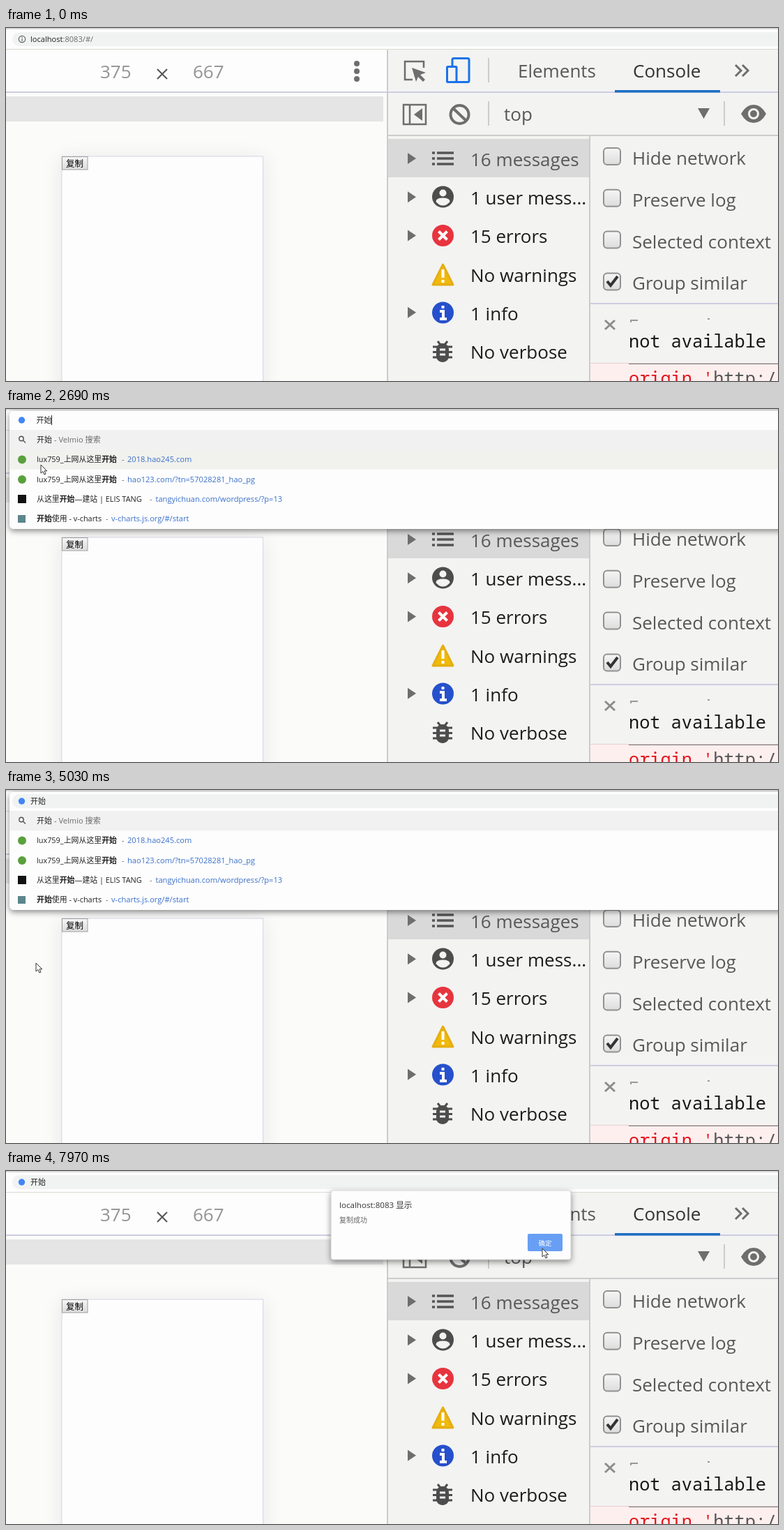
Recreate the animation shown at these times as an HTML page. Size 1107 by 506 pixels, loop 8 s.

```html
<!DOCTYPE html>
<html lang="zh">
<head>
<meta charset="utf-8">
<style>
html, body { margin: 0; width: 100%; height: 100%; overflow: hidden; background: #fbfbfb; }
svg { display: block; font: 11.1px "Open Sans", "Noto Sans CJK SC", "Noto Sans CJK", sans-serif; }
text { white-space: pre; }
.big { font-size: 26px; fill: #585858; }
.dark { fill: #1c1c1c; }
.mono { font: 25.25px "Noto Sans Mono", "DejaVu Sans Mono", monospace; fill: #161616; }
.line { fill: none; stroke: #6e6e6e; stroke-width: 2.5; }
.icon { fill: #6e6e6e; }
.sep { stroke: #ccc; stroke-width: 2; }
.rule { stroke: #cdcde2; stroke-width: 2; }
.url { fill: #3a70c8; }
.grey { fill: #6b6b6b; }
.b { font-weight: 700; }
</style>
</head>
<body>
<svg width="1107" height="506" viewBox="0 0 1107 506">
  <defs>
    <linearGradient id="face" x2="0" y2="1">
      <stop stop-color="#f6f6f6"/><stop offset="1" stop-color="#dcdcdc"/>
    </linearGradient>
    <filter id="soft" x="-20%" y="-20%" width="140%" height="140%"><feGaussianBlur stdDeviation="14"/></filter>
    <filter id="shade" x="-10%" y="-20%" width="120%" height="150%">
      <feDropShadow dx="0" dy="3" stdDeviation="4" flood-opacity=".45"/>
    </filter>
  </defs>

  <!-- device preview -->
  <rect width="547" height="506" fill="#fbfbfa"/>
  <rect y="31" width="547" height="61" fill="#fdfdfd"/>
  <path class="rule" d="M0 92H547"/>
  <rect y="98" width="541" height="36" fill="#e5e5e5"/>
  <g class="big" style="fill:#949494"><text x="135" y="72">375</text><text x="268" y="72">667</text></g>
  <path class="line" d="M217 59L231 73M231 59L217 73" style="stroke:#555;stroke-width:2"/>
  <g class="icon"><circle cx="503" cy="51" r="4"/><circle cx="503" cy="62" r="4"/><circle cx="503" cy="73" r="4"/></g>
  <rect x="78" y="186" width="293" height="340" opacity=".08" filter="url(#soft)"/>
  <rect x="80" y="184" width="288.5" height="340" fill="#fdfdfe" stroke="#d6d6e6"/>
  <rect x="80.5" y="184.5" width="36.5" height="18.5" fill="url(#face)" stroke="#a0a0a0"/>
  <text x="86" y="198.5" font-size="12.5">复制</text>

  <!-- developer tools -->
  <rect x="547" y="30" width="560" height="476" fill="#f3f3f2"/>
  <path class="sep" d="M547 30V506M692 43V78M692 105V140M1030 105V140M837 155V506"/>
  <path class="rule" d="M548 92H1107M838 395H1107"/>
  <path class="sep" d="M548 154H1107"/>
  <rect x="873" y="89" width="151" height="3.5" fill="#1c6fc4"/>
  <path class="line" d="M599 57V48H572V74H583"/>
  <path class="icon" d="M582 57L602 64L594 67L601 74L598 77L591 70L588 77Z"/>
  <g fill="#f3f3f2" stroke="#1a73e8" stroke-width="3">
    <rect x="640" y="43.5" width="24" height="34" rx="2"/><rect x="632.5" y="55.5" width="13.5" height="22" rx="1"/>
  </g>
  <path class="line" d="M1046 53L1054 61L1046 69M1056 53L1064 61L1056 69" style="stroke-width:3"/>
  <g class="big">
    <text x="734" y="71">Elements</text>
    <text x="899" y="71" style="fill:#333">Console</text>
    <text x="714" y="133">top</text>
  </g>
  <path class="line" d="M570 110H602V138H570ZM579 110V138"/>
  <path class="icon" d="M597 115V133L585 124ZM992 115H1009L1000.5 130Z"/>
  <g class="line" style="stroke-width:4"><circle cx="650.5" cy="124" r="13"/><path d="M641 115L660 133"/></g>
  <path class="icon" d="M1054 123Q1061 110 1072 110T1090 123Q1083 136 1072 136T1054 123Z"/>
  <circle cx="1072" cy="123" r="6.5" fill="#6e6e6e" stroke="#f3f3f2" stroke-width="3"/>

  <rect x="548" y="159" width="288" height="55" fill="#d9d9d9"/>
  <g id="side"></g>
  <path d="M618 179H642M618 187H642M618 195H642M611 179H615M611 187H615M611 195H615" stroke="#555" stroke-width="3.5"/>
  <circle cx="626.5" cy="242" r="15.5" fill="#4d4d4d"/>
  <circle cx="626.5" cy="236.5" r="5" fill="#f3f3f2"/>
  <path d="M616.500 249Q616.500 243.500 626.500 243.500T636.500 249Q632 254.500 626.500 254.500T616.500 249Z" fill="#f3f3f2"/>
  <circle cx="626.5" cy="297.5" r="15.5" fill="#e7343e"/>
  <path d="M620.500 291.500L632.500 303.500M632.500 291.500L620.500 303.500" stroke="#fff" stroke-width="4"/>
  <path d="M626.500 339L641 368H612Z" fill="#f0ba0c" stroke="#e5ae14" stroke-width="3" stroke-linejoin="round"/>
  <path d="M626.500 346V358M626.500 361V365" stroke="#fff" stroke-width="4"/>
  <circle cx="626.5" cy="408" r="15.5" fill="#2650cc"/>
  <path d="M626.500 398V402M622 406H627V416M622 417H632" fill="none" stroke="#fff" stroke-width="4"/>
  <g stroke="#4d4d4d" stroke-width="3">
    <path d="M612 457H640M612 464.500H640M612 472H640M619 449L623 454M633 449L629 454"/>
    <rect x="618.5" y="453.5" width="15" height="24" rx="7" fill="#4d4d4d"/>
    <path d="M622 461H630M622 468H630" stroke="#f3f3f2"/>
  </g>
  <g id="checks"></g>
  <path d="M862 363L867 369L877 356" fill="none" stroke="#333" stroke-width="4"/>

  <path class="line" d="M859 419L873 432M873 419L859 432" style="stroke:#8c8c8c;stroke-width:3"/>
  <path d="M896 422V419H906M1006 417H1009" fill="none" stroke="#999" stroke-width="2"/>
  <text class="mono" x="893" y="458">not available</text>
  <rect x="838" y="481" width="269" height="25" fill="#fdefee"/>
  <path d="M838 480.500H1107" stroke="#e6cfcf"/><path d="M893 481.500H1107" stroke="#777"/>
  <text class="mono" x="893" y="511" style="fill:#e3141c">origin '<tspan fill="#555">http:/</tspan></text>

  <!-- address bar -->
  <rect width="1107" height="30" fill="#fdfdfd"/>
  <rect width="1107" height="2" fill="#d9dbd9"/>
  <path d="M0 30.500H1107" stroke="#d8dbd0"/>
  <g id="drop">
    <rect x="5" y="3" width="1115" height="169" rx="6" fill="#fdfdfe" filter="url(#shade)"/>
    <rect x="5" y="30" width="1102" height="28.3" fill="#f1f1f1"/>
    <rect id="hover" x="5" width="1102" height="28.3" fill="#f1f1ee"/>
    <g fill="none" stroke="#555" stroke-width="1.4"><circle cx="22" cy="42.5" r="3.2"/><path d="M24.500 45L28 48.500"/></g>
    <circle cx="23" cy="72.5" r="6" fill="#5aa03c"/><circle cx="23" cy="101" r="6" fill="#5aa03c"/>
    <rect x="17" y="123" width="12" height="12" fill="#111"/>
    <rect x="17" y="152" width="11" height="11" fill="#5d858c"/>
    <g id="rows"></g>
  </g>
  <rect id="pill" x="9" y="6" width="1120" height="20" rx="10" fill="#f0f3f2"/>
  <g id="local">
    <circle cx="23" cy="16" r="4.7" fill="none" stroke="#5f6368" stroke-width="1.2"/>
    <path d="M23 13.200V14.500M23 15.500V18.800" stroke="#5f6368" stroke-width="1.3"/>
    <rect id="select" x="34" y="8" width="93" height="16" fill="#c5dbfa"/>
    <text x="35" y="20" fill="#222">localhost<tspan class="grey">:8083/#/</tspan></text>
  </g>
  <g id="query">
    <circle cx="22.5" cy="16" r="4.7" fill="#4285f4"/>
    <text id="word" y="20" font-size="11" fill="#222">开始</text>
  </g>
  <path id="caret" d="M65.500 9V23" stroke="#222"/>

  <g id="dialog">
    <rect x="466" y="28" width="344" height="99" rx="3" fill="#fdfdfe" stroke="#bbb" stroke-width=".6" filter="url(#shade)"/>
    <text x="478" y="53" font-size="11.6" fill="#333">localhost:8083 显示</text>
    <text x="478" y="74" font-size="10" fill="#666">复制成功</text>
    <rect id="ok" x="748" y="90" width="50" height="25" rx="2"/>
    <text x="773" y="106.5" font-size="9.5" fill="#fff" text-anchor="middle">确定</text>
  </g>

  <g id="pointer">
    <path id="arrow" d="M0 0V12L2.900 9.500L5 14L7 13L5 8.800H8.800Z" fill="#fff" stroke="#333"/>
    <path id="beam" d="M-3 -6H3M0 -6V6M-3 6H3" stroke="#222" stroke-width="1.2"/>
    <circle id="touch" r="8" fill="#555" fill-opacity=".65" stroke="#777" stroke-opacity=".4"/>
  </g>
</svg>
<script>
const $ = id => document.getElementById(id);
const show = (id, on) => $(id).style.display = on ? '' : 'none';
const bold = s => `<tspan class="b">${s}</tspan>`;

$('side').innerHTML = ['16 messages', '1 user mess...', '15 errors', 'No warnings', '1 info', 'No verbose']
  .map((label, i) => {
    const y = 187 + i * 55.2;
    const fold = i === 3 || i === 5 ? '' : `<path class="icon" d="M576 ${y - 8}V${y + 8}L588 ${y}Z"/>`;
    return `${fold}<text class="big ${i ? 'dark' : ''}" x="666" y="${y + 11}">${label}</text>`;
  }).join('');

$('checks').innerHTML = ['Hide network', 'Preserve log', 'Selected context', 'Group similar']
  .map((label, i) => {
    const y = 172 + i * 59.8;
    return `<rect x="857" y="${y}" width="24" height="24" rx="5" fill="url(#face)" stroke="#919191" stroke-width="2"/>
      <text class="big" x="898" y="${y + 24}">${label}</text>`;
  }).join('');

const portal = 'lux759_上网从这里' + bold('开始');
$('rows').innerHTML = [
  ['开始', 69, '- Velmio 搜索', 0],
  [portal, 166, '- ', 174, '2018.hao245.com'],
  [portal, 166, '- ', 174, 'hao123.com/?tn=57028281_hao_pg'],
  ['从这里' + bold('开始') + '—建站 | ELIS TANG', 206, '- ', 214.5, 'tangyichuan.com/wordpress/?p=13'],
  [bold('开始') + '使用 - v-charts', 143, '- ', 151, 'v-charts.js.org/#/start']
].map(([title, dashX, dash, urlX, url = ''], i) => {
  const y = 48 + i * 28.3;
  return `<text x="44" y="${y}" font-size="10.9" fill="#222">${title}</text>
    <text class="grey" x="${dashX}" y="${y}">${dash}</text>
    <text class="url" x="${urlX}" y="${y}">${url}</text>`;
}).join('');

const LOOP = 8000, FOCUS = 1500, PASTE = 2200, BLUR = 4980, CLOSE = 5180, ALERT = 6300;

// pointer stops: time, x, y
const stops = [
  [150, 640, 520], [850, 143, 17], [2150, 143, 17], [2600, 50, 80], [2850, 50, 80],
  [3500, 55, 215], [3800, 55, 215], [4400, 43, 248], [5200, 43, 248], [5850, 119, 193],
  [5920, 119, 193], [6120, 102, 194], [6800, 102, 194], [7720, 769, 111], [LOOP, 769, 111]
];

function pointerAt(t) {
  const i = Math.max(1, stops.findIndex(s => s[0] > t));
  const [t0, x0, y0] = stops[i - 1], [t1, x1, y1] = stops[i];
  const k = Math.min(1, Math.max(0, (t - t0) / (t1 - t0)));
  const e = k * k * (3 - 2 * k);
  return [x0 + (x1 - x0) * e, y0 + (y1 - y0) * e];
}

function draw(t) {
  const [x, y] = pointerAt(t);
  const editing = t >= FOCUS && t < BLUR;

  show('drop', t >= PASTE && t < CLOSE);
  const row = Math.floor((y - 30) / 28.3);
  show('hover', row >= 0 && row < 5);
  $('hover').setAttribute('y', 30 + row * 28.3);

  show('pill', !editing);
  show('local', t < PASTE);
  show('select', editing);
  show('query', t >= PASTE);
  $('word').setAttribute('x', editing ? 43.5 : 35);
  show('caret', editing && t >= PASTE && (t - PASTE) % 1060 < 530);

  show('dialog', t >= ALERT);
  $('dialog').style.opacity = Math.min(1, Math.max(0, (t - ALERT) / 120));
  const overOk = x > 748 && x < 798 && y > 90 && y < 115;
  $('ok').setAttribute('fill', overOk ? '#689ff4' : '#4285f4');

  const inPage = x > 80 && x < 369 && y > 184;
  const inBar = y < 30;
  show('pointer', t >= stops[0][0]);
  $('pointer').setAttribute('transform', `translate(${x.toFixed(1)} ${y.toFixed(1)})`);
  show('touch', inPage);
  show('beam', inBar);
  show('arrow', !inPage && !inBar);
}

const start = performance.now();
function tick() {
  draw((performance.now() - start) % LOOP);
  requestAnimationFrame(tick);
}
tick();
</script>
</body>
</html>
```
